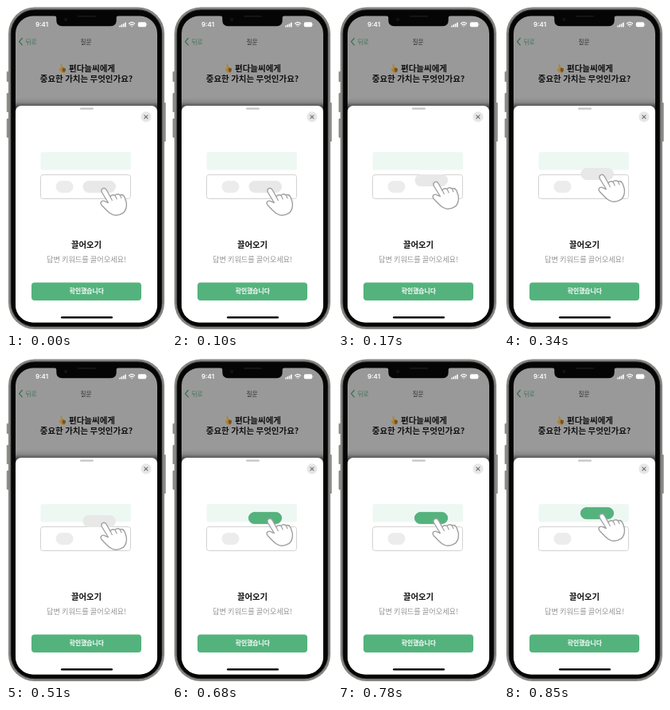
Recreate the animation shown at these times as an HTML page with a canvas. Size 201x406 px, loop 1.02 s.

```html
<!DOCTYPE html>
<html lang="ko">
<head>
<meta charset="utf-8">
<title>끌어오기</title>
<style>
html, body { margin: 0; width: 201px; height: 406px; overflow: hidden; background: #fff; }
canvas { display: block; width: 201px; height: 406px; }
</style>
</head>
<body>
<canvas id="stage"></canvas>
<script>
const W = 201, H = 406, STEP = 170;
const GREEN = '#54b37d', DIM = '#999';
const KR = '"Noto Sans CJK KR", "Noto Sans CJK", sans-serif';
// Upward drag distance at each step, for the chip and the hand
const CHIP_LIFT = [0, 8, 16, 22, 26, 32];
const HAND_LIFT = [0, 8, 17, 22, 27, 33];

const canvas = document.getElementById('stage');
const ratio = window.devicePixelRatio || 1;
canvas.width = W * ratio;
canvas.height = H * ratio;
const ctx = canvas.getContext('2d');
ctx.scale(ratio, ratio);

function box(x, y, w, h, r, fill, stroke, line = 1) {
  ctx.beginPath();
  ctx.roundRect(x, y, w, h, r);
  if (fill) { ctx.fillStyle = fill; ctx.fill(); }
  if (stroke) { ctx.strokeStyle = stroke; ctx.lineWidth = line; ctx.stroke(); }
}

function shape(d, fill, stroke, line = 1) {
  const path = new Path2D(d);
  if (fill) { ctx.fillStyle = fill; ctx.fill(path); }
  if (stroke) { ctx.strokeStyle = stroke; ctx.lineWidth = line; ctx.stroke(path); }
}

function label(text, x, y, size, color, weight = 400, family = KR) {
  ctx.font = `${weight} ${size}px ${family}`;
  ctx.fillStyle = color;
  ctx.fillText(text, x, y);
}

function drawPhone() {
  for (const [y, h] of [[82, 13], [109, 24], [141, 24]]) box(0.8, y, 3, h, 1, '#8e8e8b');
  box(198, 121, 2.7, 49, 1, '#8e8e8b');
  box(3, 1.5, 196, 403.5, 33, '#858582');
  box(5.7, 4.2, 190.6, 398.1, 30.5, '#2a2a29');
  box(6.7, 5.2, 188.6, 396.1, 29.5, '#050505');
  box(12, 12.5, 178, 384, 22, DIM);
  shape('M60 12H142Q138.7 12 138.7 15V18Q138.7 25.3 131.5 25.3H70.5Q63.3 25.3 63.3 18V15Q63.3 12 60 12Z', '#050505');
  box(90, 12, 23, 1.8, 0.9, '#171717');
  box(73, 14.7, 4.4, 4.4, 2.2, '#10121a');
}

function drawStatus() {
  label('9:41', 45, 26.2, 8, '#fff', 600, 'Inter, sans-serif');
  for (let i = 0; i < 4; i++) box(142.2 + i * 2.3, 24.5 - i * 1.3, 1.6, 2 + i * 1.3, 0.4, '#fff');
  ctx.lineCap = 'round';
  shape('M154.5 22Q158 18.8 161.5 22M156 23.8Q158 22 160 23.8', null, '#fff', 1.2);
  box(157.3, 24.7, 1.4, 1.5, 0.7, '#fff');
  box(165.8, 20.2, 10.4, 6, 1.7, '#fff');
  box(176.6, 22.2, 0.7, 1.8, 0.3, '#ddd');
}

function drawPage() {
  ctx.lineJoin = 'round';
  shape('M20.3 40.5L16.6 44.7L20.3 48.9', null, '#34704f', 1.2);
  label('뒤로', 31.5, 47.6, 7.7, '#457058');
  label('질문', 100.5, 47.6, 7.7, '#333', 500);
  shape('M69 78L68.6 73.2Q69.3 72 70.2 73L71.2 77L74.7 78Q75.8 81 73 83.5H69.5Q66.8 81.5 66.8 78.5Z', '#b3842f');
  shape('M71.2 77.3L74.8 78.2Q75.7 81 73 83.5L70.5 81Z', '#765325');
  label('편다늘씨에게', 108, 81.6, 10.5, '#111', 700);
  label('중요한 가치는 무엇인가요?', 101, 94.8, 10.5, '#111', 700);
}

function drawSheet() {
  const shadow = ctx.createLinearGradient(0, 115, 0, 126);
  shadow.addColorStop(0, 'rgba(0,0,0,0)');
  shadow.addColorStop(0.5, 'rgba(0,0,0,0.1)');
  shadow.addColorStop(1, 'rgba(0,0,0,0.5)');
  box(12, 115, 178, 18, 0, shadow);
  box(12, 125, 178, 271.5, [7, 7, 22, 22], '#fff');
  box(93, 127.6, 17, 2.2, 1.1, '#c5c5c5');
  box(169.3, 132.3, 13.2, 13.2, 6.6, '#e7e7e7');
  shape('M173.8 136.8L178 141M178 136.8L173.8 141', null, '#777', 1.1);
  box(43.5, 183, 113.5, 22.5, 2.5, '#eef8f3');
  box(43.5, 211.5, 113, 30, 3, '#fff', '#d2d2d2', 1);
  box(62.5, 219, 22, 15, 7.5, '#ececec');
  label('끌어오기', 101, 303, 10.4, '#111', 700);
  label('답변 키워드를 끌어오세요!', 101, 320.8, 9.2, '#959595', 500);
  box(32, 346.5, 138, 22.5, 4, GREEN);
  label('확인했습니다', 101.3, 360.3, 7.8, '#fff', 700);
  box(69, 389, 65, 2.5, 1.25, '#050505');
}

function drawHand() {
  shape('M128.4 246.5L120.7 234Q118.6 230 121.8 228.6Q124.5 227.5 126.5 231L131 239' +
    'Q132.6 235.5 137 237.3Q139.8 234.5 143.2 236.8Q147 235.4 149 239.5' +
    'L151.2 246Q152.4 254 147.5 259.2Q141 263.5 134.5 261.6Q130.4 260.5 126.2 255.8' +
    'L120.1 249.4Q117.8 246.5 120.4 244.6Q122.4 243.4 125 245.2Z', '#fff', '#a0a0a0', 1.4);
  shape('M131 239L133.3 243.5M137 237.3L139.2 242M143.2 236.8L145 240.7', null, '#a0a0a0', 1.2);
}

function draw(time) {
  const step = Math.floor(time / STEP) % CHIP_LIFT.length;
  const dropped = step >= 4;
  ctx.clearRect(0, 0, W, H);
  ctx.textAlign = 'center';
  drawPhone();
  drawStatus();
  drawPage();
  drawSheet();
  const chipY = 219 - CHIP_LIFT[step];
  if (dropped) box(96.4, chipY + 0.4, 41.2, 14.2, 7.1, GREEN, '#46a56f', 0.8);
  else box(96.5, chipY, 41.5, 15, 7.5, '#e8e8e8');
  ctx.save();
  ctx.translate(0, -HAND_LIFT[step]);
  drawHand();
  ctx.restore();
}

const start = performance.now();
function tick() {
  draw(performance.now() - start);
  requestAnimationFrame(tick);
}
tick();
</script>
</body>
</html>
```
